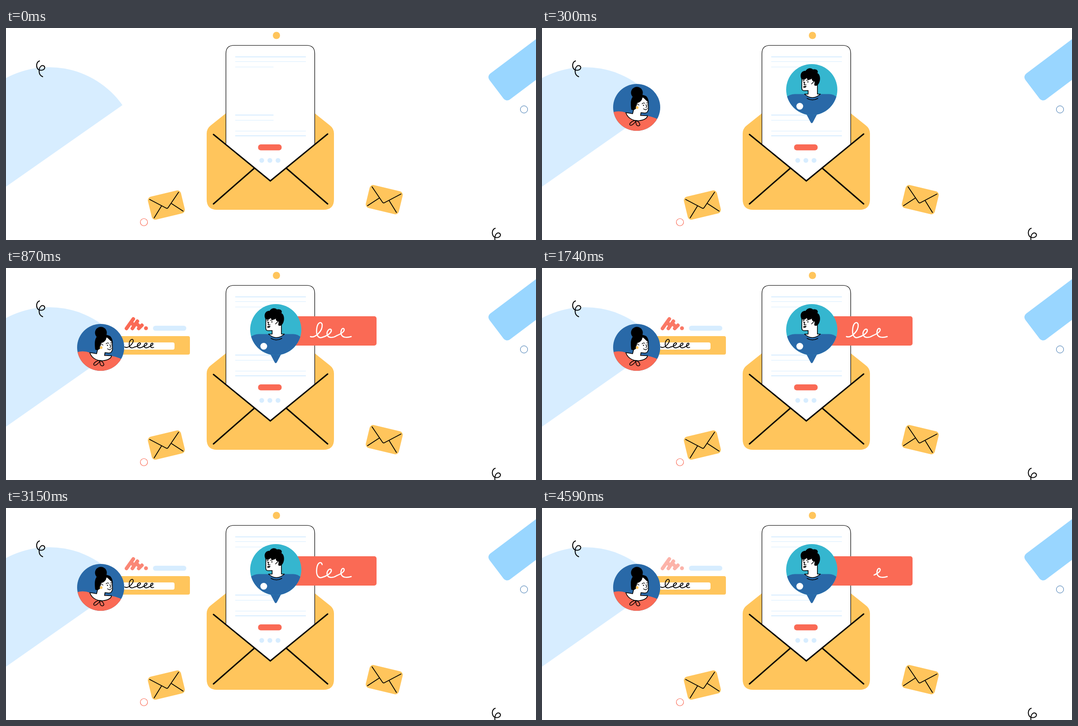
An HTML page for the animation above (4620 ms loop, 1170 by 470 pixels).

```html
<!DOCTYPE html>
<html lang="en">
<head>
<meta charset="utf-8">
<title>Personalised mail</title>
<style>
html, body { margin: 0; width: 100%; height: 100%; overflow: hidden; background: #fff; }
svg { display: block; width: 1170px; height: 470px; }
.line { fill: none; stroke: #000; stroke-linecap: round; stroke-linejoin: round; }
.amber { fill: #ffc55c; }
.coral { fill: #fa6a55; }
.pale { fill: #d7edff; }
.navy { fill: #2969a8; }
.skin { fill: #fff; stroke: #000; stroke-width: 1.6; stroke-linejoin: round; }
</style>
</head>
<body>
<svg viewBox="0 0 1170 470">
  <defs>
    <clipPath id="roundW"><circle cx="209" cy="176" r="52"/></clipPath>
    <clipPath id="roundM"><circle cx="595.5" cy="136.5" r="56.5"/></clipPath>
    <path id="curl" class="line" stroke-width="2" d="M74 73C68 75 66 83 69 89C72 95 82 95 85 90C87 85 82 82 78 84C72 88 70 104 81 108"/>
    <g id="letter">
      <rect class="amber" x="316.5" y="366.5" width="75" height="52" rx="8" transform="rotate(-13.5 354 392.5)"/>
      <path class="line" stroke-width="1.8" d="M317 380L353 399Q356 401 358 398L381 364M343 395L327 421M365 389L391 406"/>
    </g>
  </defs>

  <!-- backdrop -->
  <path class="pale" d="M-67.2 399A198 198 0 0 1 257 171Z"/>
  <rect x="1061" y="107" width="200" height="72" rx="10" fill="#99d6ff" transform="rotate(-37 1061 107)"/>
  <use href="#curl"/>
  <use href="#curl" x="1006" y="371"/>
  <circle class="amber" cx="597" cy="16.5" r="8"/>
  <circle cx="1143.5" cy="180.5" r="8" fill="none" stroke="#2969a8"/>
  <circle cx="304.5" cy="430.5" r="8" fill="none" stroke="#fa6a55" stroke-width="1.2"/>
  <use href="#letter"/>
  <use href="#letter" transform="matrix(-1 0 0 1 1189 -12)"/>

  <!-- envelope and sheet -->
  <path class="amber" d="M443 234Q443 223 452 216L485 189.500H682L715 216Q724 223 724 234V380Q724 403 701 403H466Q443 403 443 380Z"/>
  <path d="M485.500 258.500V56.500Q485.500 38.500 503.500 38.500H663.500Q681.500 38.500 681.500 56.500V258.500L583.500 339Z" fill="#fff" stroke="#000" stroke-width="1.2"/>
  <path class="line" stroke-width="3" style="stroke-linejoin:miter" d="M458 236L583.500 339L710 235M548 311L458 390M619 311L710 390"/>
  <g stroke="#d7edff" fill="none">
    <path stroke-width="2" d="M506 64H662M506 193H590.500M506 239H662"/>
    <path stroke-width="1.2" d="M506 74.500H662M506 86.500H590.500M506 204.500H590.500M506 228.500H662"/>
  </g>
  <rect class="coral" x="556.5" y="258" width="52" height="13.300" rx="6"/>
  <g class="pale">
    <circle cx="564.500" cy="293.500" r="5.300"/>
    <circle cx="582.500" cy="293.500" r="5.300"/>
    <circle cx="600.500" cy="293.500" r="5.300"/>
  </g>

  <!-- labels -->
  <rect id="pill" class="pale" x="324.500" y="128" height="11" rx="5.500"/>
  <rect id="amberBar" class="amber" x="209" y="151" height="41" rx="4"/>
  <rect id="field" x="209" y="165" height="16" rx="4" fill="#fff"/>
  <rect id="coralBar" class="coral" x="595" y="107" height="65" rx="5"/>
  <g id="mark">
    <path class="line" style="stroke:#fa6a55" stroke-width="8" d="M266 134L281 113M279 134L290 118M293 134L300 127M277 121L281 126M288 123L294 129"/>
    <circle class="coral" cx="309" cy="133.500" r="4.300"/>
  </g>
  <path id="inkDark" class="line" pathLength="1" stroke-width="1.8" d="M262 175C269 180 281 167 281 161C280 155 273 159 272 167C271 178 278 179 284 175C290 174 298 170 297 167C294 164 289 169 290 174C292 179 299 177 303 174C308 173 313 169 311 167C308 165 304 170 305 174C307 179 313 177 317 174C322 172 326 169 324 167C321 165 318 171 319 174C320 177 323 177 326 176"/>
  <path id="inkLight" class="line" pathLength="1" style="stroke:#fff" stroke-width="2.500" d="M672 152C682 156 699 140 698 126C697 118 688 119 686 134C684 150 690 156 697 154C706 152 720 144 718 137C715 132 707 140 709 148C712 157 724 154 730 150C740 146 749 140 746 135C742 131 738 140 740 147C743 156 756 154 762 152"/>

  <!-- woman -->
  <g id="woman">
    <circle class="navy" cx="209" cy="176" r="52"/>
    <g clip-path="url(#roundW)">
      <path class="coral" d="M150 189Q168 181 186 188L233 195Q250 198 262 206V240H150Z"/>
    </g>
    <path class="skin" d="M204 174L200 190L185 187.500C190 202 203 206 214 205.500C226 204 232 200 233 194.500L217.500 194L218.500 187.500L227 188.500Q234 188 235 180L234.500 164L222 152L208 163Z"/>
    <circle cx="209.500" cy="143.500" r="13"/>
    <path d="M197 181Q194 160 200 153Q214 143 230 151Q236 157 235.500 167Q230 155 222 154Q220 164 211 166Q206 170 208 178Q203 184 197 181Z"/>
    <path class="line" stroke-width="1.3" d="M208 173Q209 165 214 171M221 168Q224 165 227 167M231 166L234 166M229 170L232 175L229 176M224 179Q229 184 233 178"/>
    <circle cx="224" cy="171.500" r="1.200"/>
    <circle cx="232.500" cy="170.500" r="1.100"/>
    <circle class="amber" cx="210" cy="176.500" r="3"/>
    <path class="line" stroke-width="1.600" d="M208 205C200 205 192 211 194 215C197 218 205 211 208 205C206 211 208 217 213 217C219 216 215 208 208 205"/>
  </g>

  <!-- man -->
  <g id="man">
    <path class="navy" d="M582 188L593 209Q595.500 213 598 209L609 188Z"/>
    <circle cx="595.500" cy="136.500" r="56.500" fill="#35b6cf"/>
    <g clip-path="url(#roundM)">
      <path class="navy" d="M530 165Q540 147 558 146.500H634Q650 147 660 165V200H530Z"/>
    </g>
    <path class="skin" d="M573.500 112V134Q574 139 579 139L587.500 138.500V146.500H579.500Q597 162 614.500 146.500H608V122L604 104H580Z"/>
    <path d="M573 113C568 104 573 94 582 95C586 88 595 88 598 92C606 90 611 95 608 100C616 104 615 120 609 126C606 129 603 128 601 127L602 118C597 119 595 115 596 112C590 117 585 114 584 111C581 115 576 116 573 113Z"/>
    <path class="line" stroke-width="1.500" d="M595 124L601 118M584 116L589 114.500M576 117L579 116M580 120L578.500 126H583M585 156Q597 163 609 156"/>
    <path d="M576.500 130Q580 127.500 584 129Q582 133.500 577 132Z"/>
    <circle cx="578" cy="120.500" r="1.200"/>
    <circle cx="587" cy="119.500" r="1.300"/>
    <circle cx="569" cy="173.500" r="7.500" fill="#fff"/>
  </g>
</svg>
<script>
const LOOP = 4620, STEP = 30;
const $ = id => document.getElementById(id);
const clamp = x => Math.max(0, Math.min(1, x));
const ramp = (t, from, to) => clamp((t - from) / (to - from));
const easeOut = p => 1 - (1 - p) ** 3;

function grow(id, hidden, full, p) {
  $(id).setAttribute('width', p > 0 ? hidden + (full - hidden) * p : 0);
}

function pop(id, x, y, s) {
  $(id).setAttribute('transform', `translate(${x} ${y}) scale(${s}) translate(${-x} ${-y})`);
}

// Show only the part of a pen stroke between a and b (0..1).
function ink(id, a, b) {
  const style = $(id).style;
  style.visibility = b - a > 0.002 ? 'visible' : 'hidden';
  style.strokeDasharray = `${b - a} 2`;
  style.strokeDashoffset = -a;
}

// Each pulse dims the mark and rewrites the light signature.
const pulses = [[1710, 17], [3090, 16], [4440, 17]];

function draw(t) {
  pop('woman', 209, 176, easeOut(ramp(t, 0, 270)));
  pop('man', 595.5, 136.5, easeOut(ramp(t, 0, 270)));
  grow('pill', 0, 73.5, easeOut(ramp(t, 330, 570)));
  grow('amberBar', 45, 197, ramp(t, 400, 690));
  grow('coralBar', 50, 223, ramp(t, 370, 660));
  grow('field', 45, 163, easeOut(ramp(t, 600, 750)));
  ink('inkDark', 0, ramp(t, 660, 870));

  let dim = ramp(t, 630, 840), a = 0, b = ramp(t, 630, 870);
  for (const [start, steps] of pulses) {
    const k = (t - start) / STEP;
    if (k <= 0 || k >= steps) continue;
    dim = 1 - Math.min(k, steps - k) * 0.1;
    if (k < 6.5) a = clamp((k - 1) / 5.5);
    else b = clamp((k - 6.5) / (steps - 7));
  }
  $('mark').style.opacity = dim;
  ink('inkLight', a, b);
}

let begin;
function tick(now) {
  begin ??= now;
  draw(Math.floor((now - begin) % LOOP / STEP) * STEP);
  requestAnimationFrame(tick);
}
draw(0);
requestAnimationFrame(tick);
</script>
</body>
</html>
```
